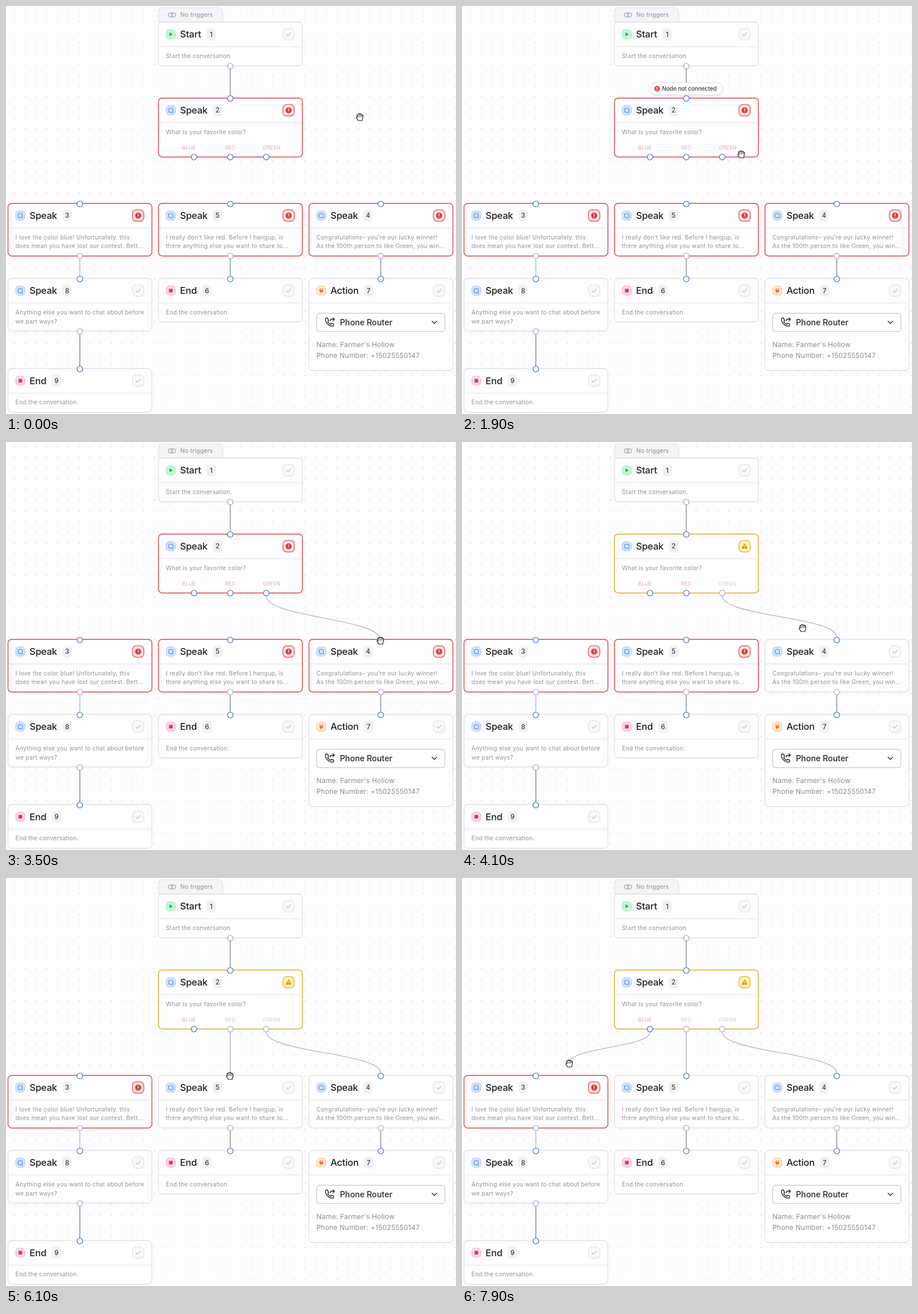
Write an HTML page that moves like this. It is 785x713 px and loops after 8000 ms.

```html
<!DOCTYPE html>
<html lang="en">
<head>
<meta charset="utf-8">
<title>Conversation flow</title>
<style>
  html, body { margin: 0; width: 100%; height: 100%; overflow: hidden; background: #fdfcfe; }
  svg { display: block; width: 785px; height: 713px; font-family: Inter, "Open Sans", sans-serif; }
  .title { font-size: 16.5px; font-weight: 500; letter-spacing: -.25px; fill: #222226; }
  .num { font-size: 11.5px; font-weight: 500; fill: #3c3c44; text-anchor: middle; }
  .body { font-size: 10.2px; letter-spacing: .27px; fill: #92929a; }
  .info { font-size: 12px; letter-spacing: .2px; fill: #8c8c95; }
  .label { font-size: 9px; letter-spacing: .15px; text-anchor: middle; }
  .pick { font-size: 14.2px; font-weight: 500; fill: #25252b; }
  .tip { font-size: 9.8px; font-weight: 500; fill: #38383f; }
  .line { fill: none; stroke: #aeaeb5; stroke-width: 1.2; }
  .stroke { fill: none; stroke-linecap: round; stroke-linejoin: round; }
</style>
</head>
<body>
<svg viewBox="0 0 785 713">
  <defs>
    <pattern id="dots" x="5.6" y="-1.4" width="18.75" height="18.75" patternUnits="userSpaceOnUse">
      <circle cx="9.4" cy="9.4" r=".85" fill="#cbcbd4"/>
    </pattern>
    <filter id="soft" x="-20%" y="-50%" width="140%" height="200%">
      <feDropShadow dx="0" dy="1" stdDeviation="1.5" flood-color="#333344" flood-opacity=".14"/>
    </filter>
  </defs>
  <rect width="785" height="713" fill="#fdfcfe"/>
  <rect width="785" height="713" fill="url(#dots)"/>
  <g id="scene"></g>
  <path id="drag" class="line"/>
  <g id="tooltip">
    <rect x="328" y="134" width="126" height="21" rx="10" fill="#fff" stroke="#e4e4ea" filter="url(#soft)"/>
    <circle cx="340.5" cy="144.5" r="5" fill="#ea5048"/>
    <path d="M340.5 142v2.8m0 1.9v.2" class="stroke" stroke="#fff" stroke-width="1.2"/>
    <text class="tip" x="349" y="148">Node not connected</text>
  </g>
  <g id="hand">
    <path d="M-2.6 6.3C-3.2 4.4-4.9 3.2-5.8 1.2-6.3 0-4.8-.7-3.8.5L-4.9-2.9C-5.2-4.3-3.6-4.8-3-3.6L-2.6-4.8C-2.3-6.2-.5-6.2-.2-5 .4-6.2 2.1-5.8 2.2-4.5 3-5.3 4.3-4.7 4.3-3.4 5.3-3.9 6-3 5.9-1.9 5.7 1 4.6 3.4 4.2 6.3Z"
      fill="#fff" stroke="#1c1c20" stroke-width="1.1" stroke-linejoin="round"/>
    <path d="M-2.9-3.4l.9 3.2M-.2-4.7l.2 4.2M2.2-4.2L2-.4M4.2-3.2L3.8-.4" class="stroke" stroke="#1c1c20" stroke-width=".8"/>
  </g>
  <path id="cross" d="M-5 0H5M0-5V5" fill="none" stroke="#222" stroke-width="1.2"/>
</svg>
<script>
const LOOP = 8000, FRAME = 100, HEAD = 43, WIDTH = 251;
const LINKED_GREEN = 3700, LINKED_RED = 6000;
const BLUE = "#5585cf", PALE = "#9db7df", FADED = "#b1b6c8";
const COLS = [3.5, 266, 528.5];
const [LEFT, MIDDLE, RIGHT] = COLS.map(x => x + WIDTH / 2 - .2);
const $ = id => document.getElementById(id);

// Card rows: kind, number, column, top, height, body lines
const cards = [
  ["Start", 1, 1, 28, 76.5, ["Start the conversation."]],
  ["Speak", 2, 1, 160.8, 103, ["What is your favorite color?"]],
  ["Speak", 3, 0, 344.8, 92, ["I love the color blue! Unfortunately, this", "does mean you have lost our contest. Bett..."]],
  ["Speak", 5, 1, 344.8, 92, ["I really don't like red. Before I hangup, is", "there anything else you want to share to..."]],
  ["Speak", 4, 2, 344.8, 92, ["Congratulations– you're our lucky winner!", "As the 100th person to like Green, you win..."]],
  ["Speak", 8, 0, 476, 92, ["Anything else you want to chat about before", "we part ways?"]],
  ["End", 6, 1, 476, 76, ["End the conversation."]],
  ["Action", 7, 2, 476, 161, []],
  ["End", 9, 0, 633.5, 76.5, ["End the conversation."]]
];

// Per kind: icon fill, icon border, badge offset, glyph around 0,0
const kinds = {
  Start: ["#c6f6d5", "#a5e6ba", 92, '<path d="M-2.4-3.4 3.6 0-2.4 3.4Z" fill="#23b458"/>'],
  Speak: ["#d2e4fe", "#a9c8f5", 103, '<path d="M3.9 3.7H-.9A2.9 2.9 0 0 1-3.8.8V-.8A2.9 2.9 0 0 1-.9-3.7H.7A2.9 2.9 0 0 1 3.6-.8V1.8Q3.6 3 3.9 3.7Z" class="stroke" stroke="#5a8ce8" stroke-width="1.1"/>'],
  End: ["#fbd6e7", "#f3b4d1", 84.5, '<rect x="-3.2" y="-3.2" width="6.4" height="6.4" rx=".8" fill="#df2f83"/>'],
  Action: ["#fee8cd", "#f6cb96", 104, '<path d="M-3.3-1.5H3.3V0Q3 2.6.7 2.8V4.6H-.7V2.8Q-3 2.6-3.3 0ZM-2.3-4.4h1.2v2.6h-1.2ZM1.1-4.4h1.2v2.6H1.1Z" fill="#ee7330"/>']
};

// Per status: fill, border, card border, glyph around 0,0
const states = {
  ok: ["#f7faf9", "#dfe5e4", "#dfe0e8", '<path d="M-3.8.3-1.2 2.9 4-2.8" class="stroke" stroke="#b4c5be" stroke-width="1.2"/>'],
  error: ["#fde1e1", "#df5356", "#df6163", '<circle r="5.3" fill="#e23a3e"/><path d="M0-2.7V.4M0 2.4v.1" class="stroke" stroke="#fff" stroke-width="1.3"/>'],
  warn: ["#fdf2ad", "#dfb43c", "#e4b94b", '<path d="M0-4.4 4.8 3.8H-4.8Z" fill="#d99b0c" stroke="#d99b0c" stroke-linejoin="round"/><path d="M0-1.8V1M0 2.8v.1" class="stroke" stroke="#fff6cf" stroke-width="1.1"/>']
};

const at = (x, y, body) => `<g transform="translate(${x} ${y})">${body}</g>`;
const text = (cls, x, y, s, fill) => `<text class="${cls}" x="${x}" y="${y}"${fill ? ` style="fill:${fill}"` : ""}>${s}</text>`;
const rect = (x, y, w, h, r, fill, stroke = "none", sw = 1) =>
  `<rect x="${x}" y="${y}" width="${w}" height="${h}" rx="${r}" fill="${fill}" stroke="${stroke}" stroke-width="${sw}"/>`;
const port = (x, y, color = BLUE) => `<circle cx="${x}" cy="${y}" r="4.9" fill="#fdfdff" stroke="${color}" stroke-width="1.4"/>`;
const edge = (x, y1, y2, color = "#85858d", w = 1.3) => `<path d="M${x} ${y1}V${y2}" stroke="${color}" stroke-width="${w}"/>`;
const curve = (x1, y1, x2, y2) => {
  const mid = (y1 + y2) / 2;
  return `M${x1} ${y1}C${x1} ${mid} ${x2} ${mid} ${x2} ${y2}`;
};

function card([kind, num, col, y, h, lines], status) {
  const x = COLS[col], [fill, border, badge, glyph] = kinds[kind];
  const [sFill, sBorder, outline, mark] = states[status];
  const mid = y + 21.4;
  return rect(x, y, WIDTH, h, 6.5, "#fefdff", outline, status === "ok" ? 1.3 : 1.7) +
    `<path d="M${x + 1} ${y + HEAD}h${WIDTH - 2}" stroke="#e6e6ed" stroke-width="1.2"/>` +
    at(x + 21.5, mid, rect(-8, -8, 16, 16, 5.2, fill, border) + glyph) +
    text("title", x + 37.5, mid + 6, kind) +
    rect(x + badge - 8.2, mid - 10.5, 16.4, 21, 6.5, "#f1f1f4") +
    text("num", x + badge, mid + 4.2, num) +
    at(x + 227, mid, rect(-10, -10, 20, 20, 6.8, sFill, sBorder, 1.3) + mark) +
    lines.map((s, i) => text("body", x + 13, y + 62.8 + i * 15.8, s)).join("");
}

const trigger = `<path d="M266 28V8.5a5.5 5.5 0 0 1 5.5-5.5h101a5.5 5.5 0 0 1 5.5 5.5V28Z" fill="#f4f4f9" stroke="#e0e1ea" stroke-width="1.2"/>
  <g fill="none" stroke="#8d8d97"><circle cx="287" cy="15.5" r="3.9"/><circle cx="291.8" cy="15.5" r="3.9"/></g>` +
  text("body", 304, 19.2, "No triggers", "#8a8a94");

const router = rect(542, 537, 223.5, 32, 5, "#fff", "#dadbe1", 1.9) +
  `<g class="stroke" stroke="#25252b" stroke-width="1.4">
    <path d="M560.5 545.2h-1.8a1.5 1.5 0 0 0-1.5 1.5c0 7 5.8 12.8 12.8 12.8a1.5 1.5 0 0 0 1.5-1.5v-2.1l-3.5-1.4-1.5 1.8a9 9 0 0 1-5.2-5.2l1.7-1.5Z"/>
    <path d="M565.6 550.2q0-2.7 2.7-2.7h4.5m-2.5-2.6 2.6 2.6-2.6 2.6"/>
    <path d="M743.3 550.8l4 4 4-4"/>
  </g>` +
  text("pick", 582.5, 557.5, "Phone Router") +
  text("info", 541.5, 596, "Name: Farmer's Hollow") +
  text("info", 541.5, 615, "Phone Number: +15025550147");

function scene(green, red) {
  const status = n => n === 2 ? (green ? "warn" : "error")
    : n === 3 || (n === 5 && !red) || (n === 4 && !green) ? "error" : "ok";
  const label = (x, s, linked) => text("label", x, 251.2, s, linked ? "#d2d2d8" : "#eea8ae");
  return trigger + cards.map(c => card(c, status(c[1]))).join("") + router +
    label(319, "BLUE") + label(391, "RED", red) + label(463.5, "GREEN", green) +
    edge(MIDDLE, 105, 161) + edge(LEFT, 437, 477, "#b8b8bf") + edge(MIDDLE, 437, 477) +
    edge(RIGHT, 437, 477) + edge(LEFT, 568, 634, "#929299", 1.6) +
    (green ? `<path class="line" d="${curve(454, 269, RIGHT, 341)}"/>` : "") +
    (red ? edge(MIDDLE, 264, 346, "#aeaeb5", 1.2) : "") +
    port(MIDDLE, 105, PALE) + port(MIDDLE, 161.5) +
    port(328, 264) + port(MIDDLE, 264, red ? FADED : BLUE) + port(454, 264, green ? FADED : BLUE) +
    [LEFT, MIDDLE, RIGHT].map(x => port(x, 346) + port(x, 437, "#abb5d6") + port(x, 477)).join("") +
    port(LEFT, 568.5, PALE) + port(LEFT, 634.5);
}

// Cursor path: time, x, y
const path = [
  [0, 617, 194], [300, 612, 193], [1000, 494, 185], [1500, 493, 186], [1900, 487, 259],
  [2300, 455, 266], [2500, 455, 266], [2900, 563, 298], [3500, 653, 347], [3800, 652, 346],
  [4100, 594, 325], [4900, 393, 266], [5400, 393, 266], [5900, 391, 347], [6200, 390, 345],
  [6800, 330, 282], [7050, 329, 266], [7250, 329, 266], [7900, 187, 324], [8000, 170, 330]
];
// Drag spans: start, end, port x
const drags = [[2500, LINKED_GREEN, 454], [5400, LINKED_RED, MIDDLE], [7250, LOOP, 328]];
const hovers = [[2200, 2500], [4900, 5400], [7000, 7250]];
const within = (t, [a, b]) => t >= a && t < b;

function cursor(t) {
  const i = path.findIndex(p => p[0] > t);
  const [t0, x0, y0] = path[i - 1], [t1, x1, y1] = path[i];
  const k = (t - t0) / (t1 - t0);
  return [x0 + (x1 - x0) * k, y0 + (y1 - y0) * k];
}

const show = (id, on) => $(id).setAttribute("visibility", on ? "visible" : "hidden");
let drawn = "";

function render(now) {
  const t = Math.floor(now % LOOP / FRAME) * FRAME;
  const green = t >= LINKED_GREEN, red = t >= LINKED_RED, key = `${green}${red}`;
  if (key !== drawn) {
    $("scene").innerHTML = scene(green, red);
    drawn = key;
  }
  const [x, y] = cursor(t), drag = drags.find(d => within(t, d)), hover = hovers.some(h => within(t, h));
  for (const id of ["hand", "cross"]) $(id).setAttribute("transform", `translate(${x} ${y})`);
  show("hand", !hover);
  show("cross", hover);
  show("tooltip", within(t, [900, 2000]));
  show("drag", drag);
  if (drag) $("drag").setAttribute("d", curve(drag[2], 269, x, y - 1));
}

const start = performance.now();
function tick() {
  render(performance.now() - start);
  requestAnimationFrame(tick);
}
tick();
</script>
</body>
</html>
```
